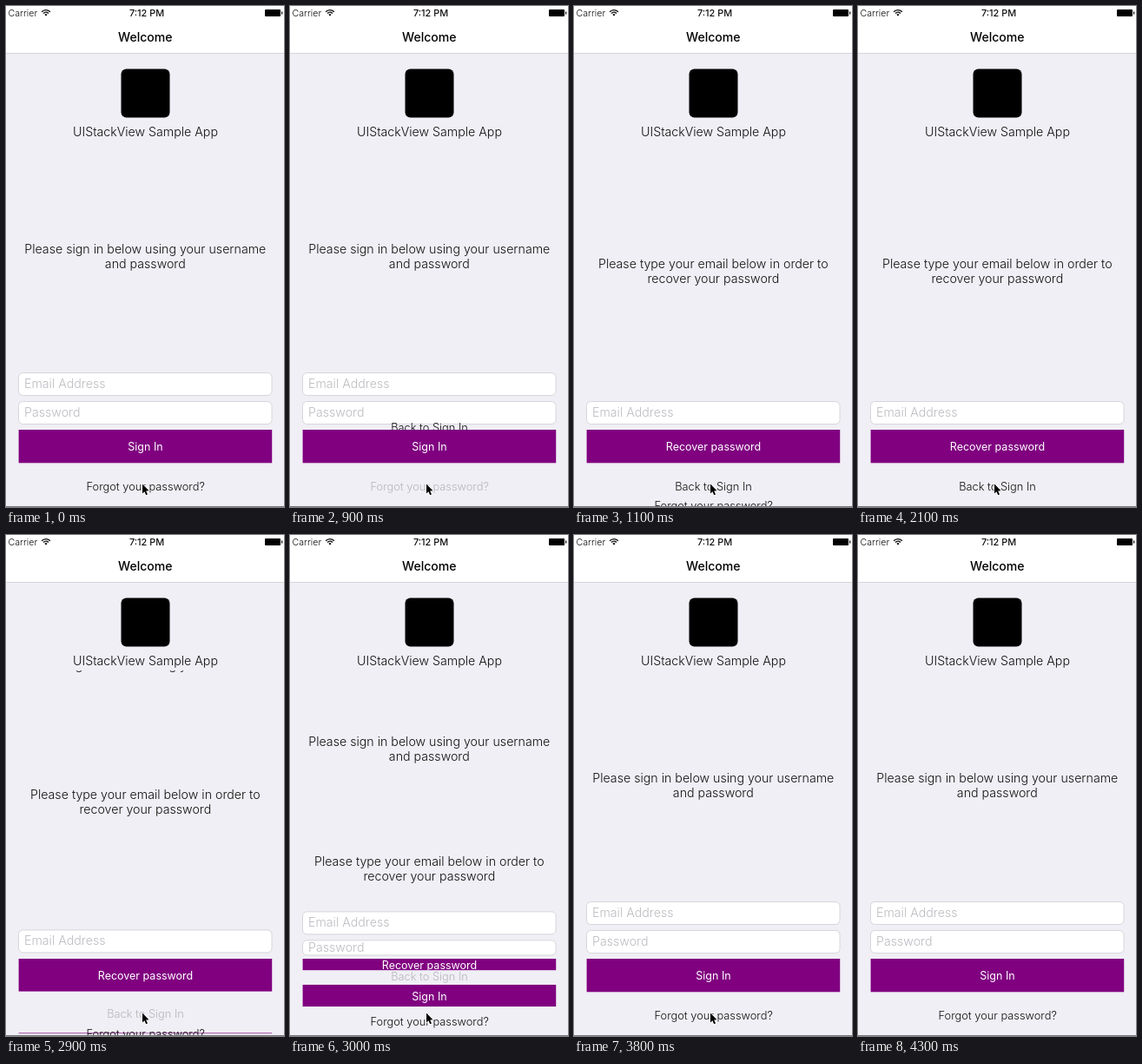
An HTML page with a canvas for the animation above (5000 ms loop, 320x577 px).

```html
<!DOCTYPE html>
<html lang="en">
<head>
<meta charset="utf-8">
<title>Sign in</title>
<style>
  html, body { margin: 0; width: 100%; height: 100%; overflow: hidden; background: #f0eff5; }
  canvas { display: block; }
</style>
</head>
<body>
<canvas id="stage" width="320" height="577"></canvas>
<script>
const ctx = document.getElementById('stage').getContext('2d');
const LOOP = 5000, STEP = 100;
const PURPLE = '#800080';

const mix = (a, b, p) => a + (b - a) * p;
const ease = (t, start, length) => {
  const k = Math.min(1, Math.max(0, (t - start) / length));
  return k * k * (3 - 2 * k);
};

function rect(x, y, w, h, color) {
  ctx.fillStyle = color;
  ctx.fillRect(x, y, w, h);
}

function text(str, x, y, { size = 14.2, weight = 300, color = '#111', align = 'center', alpha = 1 } = {}) {
  ctx.font = `${weight} ${size}px Inter, sans-serif`;
  ctx.textAlign = align;
  ctx.fillStyle = color;
  ctx.globalAlpha = alpha;
  ctx.fillText(str, x, y);
  ctx.globalAlpha = 1;
}

function clipped(x, y, w, h, draw) {
  if (h <= 0) return;
  ctx.save();
  ctx.beginPath();
  ctx.rect(x, y, w, h);
  ctx.clip();
  draw();
  ctx.restore();
}

function roundRect(x, y, w, h, r) {
  ctx.beginPath();
  ctx.roundRect(x, y, w, h, r);
}

function statusBar() {
  rect(0, 0, 320, 54, '#fff');
  rect(0, 54, 320, 1, '#d5d5d8');
  text('Carrier', 2.5, 12, { size: 10.6, align: 'left' });
  text('7:12 PM', 162, 12, { size: 10.9, weight: 500 });
  text('Welcome', 160.3, 41, { size: 14.1, weight: 550, color: '#000' });

  // Wi-Fi fan
  ctx.strokeStyle = ctx.fillStyle = '#111';
  ctx.lineWidth = 1.4;
  for (const r of [4, 6.7]) {
    ctx.beginPath();
    ctx.arc(46, 11.3, r, -Math.PI * 0.76, -Math.PI * 0.24);
    ctx.stroke();
  }
  ctx.beginPath();
  ctx.moveTo(46, 11.8);
  ctx.arc(46, 11.3, 2.2, -Math.PI * 0.76, -Math.PI * 0.24);
  ctx.fill();

  // Battery
  ctx.fillStyle = '#000';
  roundRect(298, 4, 18, 8, 1);
  ctx.fill();
  rect(317, 6.5, 1.2, 3, '#000');
}

function message(lines, top, bottom) {
  const h = bottom - top;
  const oneLine = h < 36;
  const first = oneLine ? bottom - 6.5 : (top + bottom) / 2 - 3.5;
  clipped(0, top, 320, h, () =>
    lines.slice(0, oneLine ? 1 : 2).forEach((line, i) => text(line, 160.3, first + 17.3 * i)));
}

function field(label, y, h) {
  if (h < 1) return;
  ctx.fillStyle = '#fff';
  ctx.strokeStyle = '#d6d6da';
  ctx.lineWidth = 1;
  roundRect(14.5, y, 291.5, h, Math.min(5, h / 2));
  ctx.fill();
  ctx.stroke();
  clipped(15, y, 290, h, () =>
    text(label, 21, y + h / 2 + 4.5, { align: 'left', color: '#bcbcc2' }));
}

function button(label, y, h) {
  rect(14.6, y, 291.6, h, PURPLE);
  clipped(15, y, 291, h, () =>
    text(label, 160.5, y + h / 2 + 5, { size: 12.5, weight: 400, color: '#fff' }));
}

function pointer(x, y) {
  ctx.beginPath();
  [[0, 0], [0, 11], [2.4, 8.8], [4.2, 12.8], [6, 12], [4.2, 8], [7.5, 7.8]]
    .forEach(([dx, dy]) => ctx.lineTo(x + dx, y + dy));
  ctx.closePath();
  ctx.lineJoin = 'round';
  ctx.lineWidth = 1.6;
  ctx.strokeStyle = '#fff';
  ctx.stroke();
  ctx.fillStyle = '#000';
  ctx.fill();
}

function draw(t) {
  // p = 0: sign-in form, p = 1: recovery form
  const p = ease(t, 930, 170) - ease(t, 2885, 190);

  rect(0, 0, 320, 577, '#f0eff5');
  statusBar();

  ctx.fillStyle = '#000';
  roundRect(132.5, 72.5, 56, 56, 6);
  ctx.fill();
  text('UIStackView Sample App', 160.5, 149.5);

  const bottom = mix(420, 454, p);
  const split = mix(bottom, 156, p);
  message(['Please sign in below using your username', 'and password'], 156, split);
  message(['Please type your email below in order to', 'recover your password'], split, bottom);

  field('Email Address', mix(422.5, 455.5, p), 26);
  field('Password', mix(455.5, 488.5, p), 26 * (1 - p));

  const link = { size: 12.8 };
  if (t >= 900 && t < 3100) {
    text('Back to Sign In', 160.5, mix(489.5, 557.5, p), { ...link, alpha: t >= 2700 ? 0.25 : 1 });
  }
  button('Recover password', 488, 38.3 * p);
  button('Sign In', mix(488, 575, p), 38.3 * (1 - p));
  if (t < 1200 || t >= 2900) {
    const alpha = t >= 700 && t < 1000 ? 0.25 : 1;
    text('Forgot your password?', 160.7, mix(557.5, 579.5, p), { ...link, alpha });
  }

  rect(0, 576, 320, 1, '#77777b');
  if (t < 4100) pointer(157, 550.5);
  else if (t < 4200) pointer(160, 535);
  else if (t < 4300) pointer(168, 503);
}

function tick() {
  const t = performance.now() % LOOP;
  draw(Math.floor(t / STEP) * STEP);
  requestAnimationFrame(tick);
}
tick();
</script>
</body>
</html>
```
